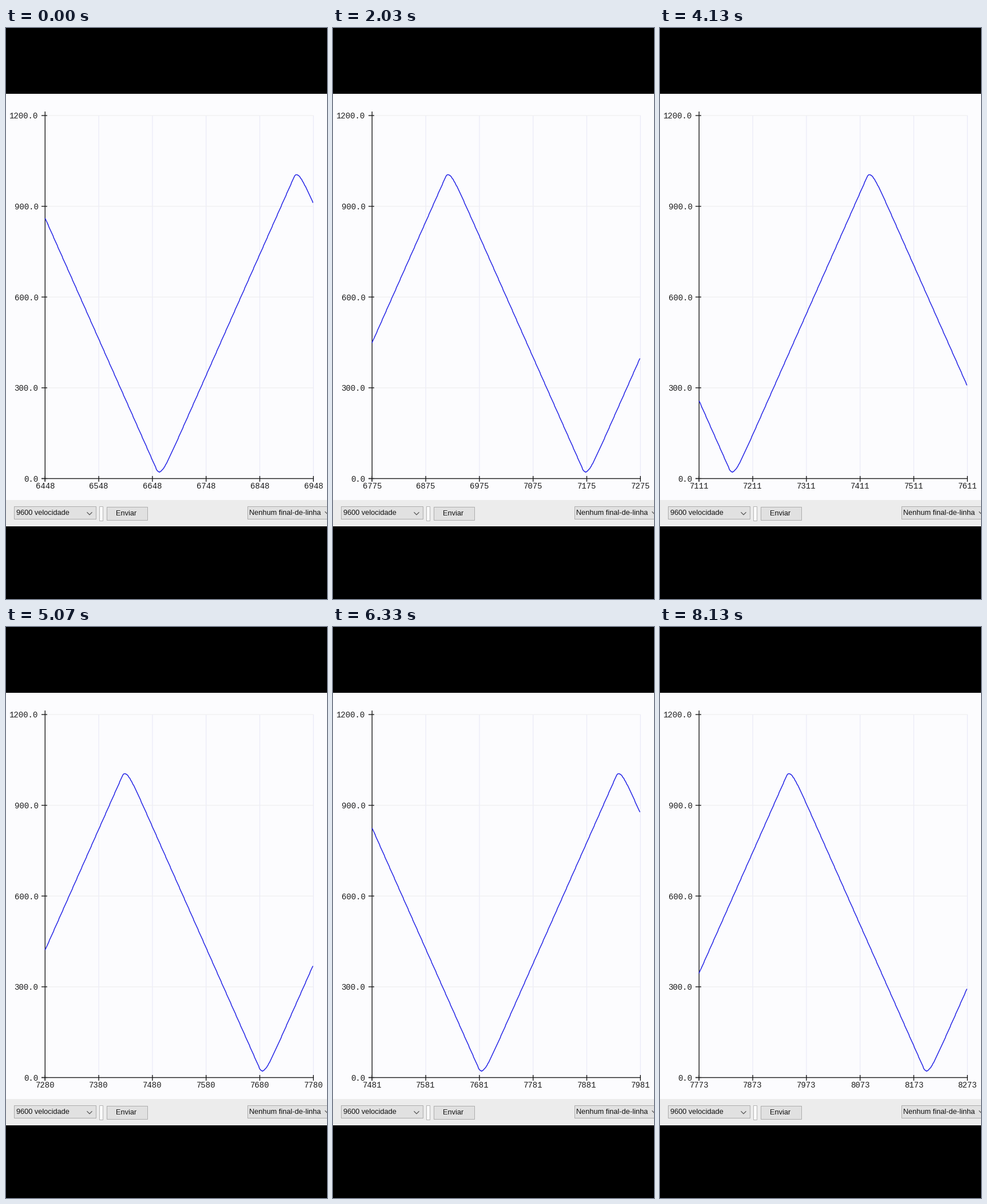
Write a matplotlib script that moves like this. It is 561 px wide and 998 px high and loops after 8160 ms.

```python
import numpy as np
import matplotlib.pyplot as plt
from matplotlib.animation import FuncAnimation
from matplotlib.patches import Rectangle

W, H, DPI = 561, 998, 64
PT = 72 / DPI                      # points per pixel
LOOP, TICK = 8160, 20              # ms
FPS = 30

X0, Y0 = 68.3, 787.5               # plot origin
SX, SY = 0.938, 0.52875            # pixels per sample / per unit
SPAN = 500

# screen refresh -> first visible sample
REFRESH = [0, 37, 86, 124, 152, 190, 244]
FIRST = [6448, 6640, 6915, 7111, 7280, 7481, 7773]

INK, BLUE = "#1c1c1c", "#2424e6"

fig = plt.figure(figsize=(W / DPI, H / DPI), dpi=DPI, facecolor="black")
ax = fig.add_axes([0, 0, 1, 1])
ax.set_xlim(0, W)
ax.set_ylim(H, 0)
ax.axis("off")


def box(x, y, w, h, fill, edge=None):
    ax.add_patch(Rectangle((x, y), w, h, facecolor=fill,
                           edgecolor=edge or "none", lw=PT if edge else 0))


def stroke(xs, ys, color, width=1.0):
    return ax.plot(xs, ys, color=color, lw=width * PT, snap=False,
                   solid_capstyle="butt")[0]


def label(x, y, s, font, size, ha="left", color=INK):
    return ax.text(x, y, s, family=font, fontsize=size * PT, color=color,
                   ha=ha, va="baseline")


def mono(x, y, s, ha):
    return label(x, y, s, "Liberation Mono", 14, ha)


def ui_text(x, y, s):
    label(x, y, s, "Liberation Sans", 12.8, color="#111111")


def chevron(x, y):
    stroke([x - 4.5, x, x + 4.5], [y - 2.2, y + 2.3, y - 2.2], "#505050", 1.2)


def wave(n):
    """Triangle of step 4 and period 512, smoothed by a 1/8 low-pass."""
    m = n % 256
    ramp = 4 * m - 28 + 56 * 0.875 ** m
    return np.where(n % 512 < 256, ramp, 1024 - ramp) + 1


def first_sample(ms):
    refresh = int((ms + 5) * FPS / 1000)
    return int(round(np.interp(refresh, REFRESH, FIRST)))


# window background and grid
box(0, 114.5, W, 710.5, "#fcfcfe")
box(0, 825, W, 46, "#ececec")
tick_x = [X0 + 100 * SX * i for i in range(6)]
tick_y = [Y0 - 300 * SY * i for i in range(5)]
for x in tick_x[1:]:
    stroke([x, x], [tick_y[-1], Y0], "#ebebf8", 1.3)
for y in tick_y[1:]:
    stroke([X0, tick_x[-1]], [y, y], "#f0f0f1", 1.3)

# axes
stroke([X0, X0], [146, 793], INK, 1.4)
stroke([62, 538], [Y0, Y0], INK, 1.4)
for i, y in enumerate(tick_y):
    stroke([62, 72], [y, y], INK, 1.4)
    mono(56.5, y + 5.5, f"{300 * i:.1f}", "right")
for x in tick_x:
    stroke([x, x], [783, 793], INK, 1.4)
x_labels = [mono(x, 804.8, "", "center") for x in tick_x]

# bottom bar
box(14.5, 835.5, 143, 22, "#e1e1e1", "#adadad")
ui_text(18, 851, "9600 velocidade")
chevron(146, 848.5)
box(163.5, 835.5, 6, 25, "#fbfbfb", "#b4b4b4")
box(176.5, 836.5, 71, 23, "#e1e1e1", "#adadad")
ui_text(192.5, 852, "Enviar")
box(422.5, 835.5, 150, 22, "#e1e1e1", "#adadad")
ui_text(425.5, 851, "Nenhum final-de-linha")
chevron(562, 847.5)

offsets = np.arange(SPAN)
curve = stroke(X0 + SX * offsets, np.full(SPAN, Y0), BLUE, 1.5)


def update(i):
    start = first_sample(i * TICK + TICK / 2)
    # heights snap to whole pixels
    curve.set_ydata(np.floor(Y0 - SY * wave(start + offsets)) + 0.5)
    for j, text in enumerate(x_labels):
        text.set_text(str(start + 100 * j))
    return [curve, *x_labels]


anim = FuncAnimation(fig, update, frames=LOOP // TICK, interval=TICK,
                     repeat=True, repeat_delay=0, blit=False)
plt.show()
```
